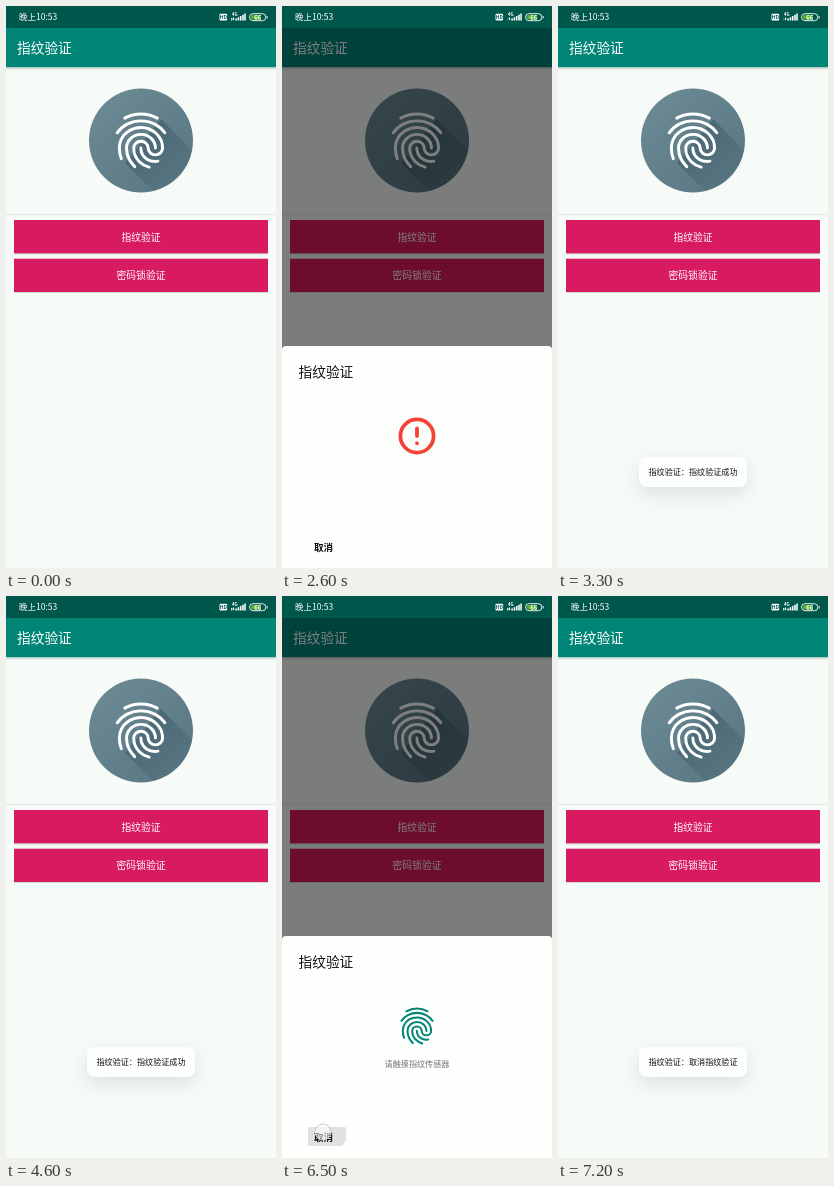
These frames come from a looping animation (270 px wide and 562 px high, 8000 ms). An HTML page:

```html
<!DOCTYPE html>
<html lang="zh-CN">
<head>
<meta charset="utf-8">
<title>指纹验证</title>
<style>
@property --open { syntax: "<number>"; inherits: true; initial-value: 0; }
@property --error { syntax: "<number>"; inherits: true; initial-value: 0; }

html, body { margin: 0; height: 100%; overflow: hidden; background: #f7fbf8; }
svg.stage {
  display: block; width: 100vw; height: 100vh;
  font-family: "Noto Sans CJK SC", "Noto Sans CJK", "Noto Sans", sans-serif;
  animation: open 8s step-end infinite, error 8s step-end infinite;
}
.title { font-size: 13.7px; }
.button { font-size: 9.8px; fill: #fff; text-anchor: middle; }
.small { font-size: 8.1px; text-anchor: middle; }
.print { fill: none; stroke-linecap: round; }

.dim { opacity: min(.5, calc(var(--open) * .55)); }
.sheet { transform: translateY(calc((1 - var(--open)) * 222px)); }
.content { opacity: min(1, calc(var(--open) * 1.15)); }
.idle { opacity: calc(1 - var(--error)); }
.failed { opacity: var(--error); }

.toast {
  opacity: 0; transform-origin: 135px 466px;
  animation: 8s step-end infinite;
}
.toast rect { filter: drop-shadow(0 7px 9px rgba(0, 30, 20, .11)); }
.passed { animation-name: passed; }
.cancelled { animation-name: cancelled; }
.touch { opacity: 0; animation: touch 8s step-end infinite; }
.ripple { opacity: 0; transform-origin: 41px 534px; animation: ripple 8s step-end infinite; }
.traffic { animation: traffic 8s step-end infinite; }

/* The screen refreshes every 100 ms, which is 1.25% of the loop. */
@keyframes open {
  0% { --open: 0; }
  22.5% { --open: .14; }
  23.75% { --open: .46; }
  25% { --open: .82; }
  26.25% { --open: .96; }
  27.5% { --open: 1; }
  35% { --open: .6; }
  36.25% { --open: .158; }
  37.5% { --open: 0; }
  68.75% { --open: .14; }
  70% { --open: .46; }
  71.25% { --open: .82; }
  72.5% { --open: .96; }
  73.75% { --open: 1; }
  83.75% { --open: .6; }
  85% { --open: .158; }
  86.25%, 100% { --open: 0; }
}
@keyframes error {
  0% { --error: 0; }
  28.75% { --error: .25; }
  30% { --error: .5; }
  31.25% { --error: .8; }
  32.5% { --error: 1; }
  37.5%, 100% { --error: 0; }
}
@keyframes passed {
  0% { opacity: 0; }
  36.25% { opacity: .92; transform: scale(.955); }
  37.5% { opacity: 1; transform: scale(.985); }
  38.75% { opacity: 1; transform: none; }
  60% { opacity: .35; transform: none; }
  61.25%, 100% { opacity: 0; }
}
@keyframes cancelled {
  0% { opacity: 0; }
  85% { opacity: .92; transform: scale(.955); }
  86.25% { opacity: 1; transform: scale(.985); }
  87.5%, 100% { opacity: 1; transform: none; }
}
@keyframes touch {
  0% { opacity: 0; }
  17.5% { opacity: 1; transform: translate(188px, 227px); }
  20% { opacity: 0; }
  66.25% { opacity: 1; transform: translate(188px, 269px); }
  68.75% { opacity: 0; }
  81.25% { opacity: 1; transform: translate(41px, 536px); }
  83.75%, 100% { opacity: 0; }
}
@keyframes ripple {
  0% { opacity: 0; }
  81.25% { opacity: 1; transform: none; }
  82.5% { opacity: .7; transform: scale(1.5); }
  83.75%, 100% { opacity: 0; }
}
@keyframes traffic {
  0% { opacity: 1; }
  22.5% { opacity: .3; }
  57.5% { opacity: 1; }
  100% { opacity: 1; }
}
</style>
</head>
<body>
<svg class="stage" viewBox="0 0 270 562">
  <defs>
    <symbol id="print" viewBox="0 0 24 24">
      <path d="M6.2 3.97C7.9 3 9.9 2.5 12 2.5s4 .5 5.8 1.47"/>
      <path d="M3.5 9.22c.95-1.33 2.14-2.38 3.57-3.11 3-1.55 6.85-1.55 9.86 0 1.43.73 2.6 1.75 3.56 3.08"/>
      <path d="M4.97 18.45c-.63-1.64-.7-2.94-.7-3.78 0-1.12.21-2.14.63-3.02 1.27-2.62 4.03-4.32 7.06-4.32 4.28 0 7.75 3.29 7.75 7.33a2.58 2.44 0 0 1-5.16 0 2.58 2.44 0 0 0-5.16 0c0 1.86.72 3.58 2.02 4.87 1 1 2 1.56 3.5 1.97"/>
      <path d="M9.75 21.29c-.82-.83-1.25-1.35-1.92-2.53-.65-1.16-.99-2.58-.99-4.1 0-2.7 2.31-4.89 5.16-4.89s5.16 2.19 5.16 4.89"/>
      <path d="M11.94 14.66c0 1.58.8 3.07 2.16 3.98.79.53 1.71.8 2.82.8.27 0 .7-.03 1.12-.11"/>
    </symbol>
    <linearGradient id="disc" x2="1" y2="1">
      <stop stop-color="#6d8c94"/>
      <stop offset=".6" stop-color="#5f7e8a"/>
      <stop offset="1" stop-color="#587681"/>
    </linearGradient>
    <linearGradient id="cast" gradientUnits="userSpaceOnUse" x1="135" y1="134" x2="176" y2="175">
      <stop stop-color="#1d3c48" stop-opacity=".34"/>
      <stop offset="1" stop-color="#1d3c48" stop-opacity=".04"/>
    </linearGradient>
    <linearGradient id="fade" x2="0" y2="1">
      <stop stop-color="#003c32" stop-opacity=".3"/>
      <stop offset="1" stop-color="#003c32" stop-opacity="0"/>
    </linearGradient>
    <clipPath id="round"><circle cx="135" cy="134.5" r="52"/></clipPath>
    <clipPath id="cancel"><rect x="26" y="531" width="38" height="19" rx="1.5"/></clipPath>
  </defs>

  <rect width="270" height="562" fill="#f7fbf8"/>
  <rect y="22" width="270" height="39" fill="#008577"/>
  <rect y="61" width="270" height="3" fill="url(#fade)"/>
  <text class="title" x="11" y="47.2" fill="#fff">指纹验证</text>

  <circle cx="135" cy="134.5" r="52" fill="url(#disc)"/>
  <path d="M155 113l50 50-40 40-46-46z" fill="url(#cast)" clip-path="url(#round)"/>
  <use class="print" href="#print" x="101.4" y="101" width="67.2" height="67.2" stroke="#fff" stroke-width="1.05"/>

  <path d="M0 208.5h270" stroke="#e3e8e5"/>
  <g fill="#24332c" opacity=".16">
    <rect x="8" y="215" width="254" height="33.5"/>
    <rect x="8" y="253.5" width="254" height="33.5"/>
  </g>
  <g fill="#d81b60">
    <rect x="8" y="214" width="254" height="33.3"/>
    <rect x="8" y="252.7" width="254" height="33.3"/>
  </g>
  <text class="button" x="135" y="234.7">指纹验证</text>
  <text class="button" x="135" y="273.2">密码锁验证</text>

  <g class="toast passed">
    <rect x="81" y="451" width="108" height="30" rx="8" fill="#fdfffe"/>
    <text class="small" x="135" y="469.1" fill="#111">指纹验证：指纹验证成功</text>
  </g>
  <g class="toast cancelled">
    <rect x="81" y="451" width="108" height="30" rx="8" fill="#fdfffe"/>
    <text class="small" x="135" y="469.1" fill="#111">指纹验证：取消指纹验证</text>
  </g>

  <rect class="dim" y="22" width="270" height="540"/>

  <g class="sheet">
    <path d="M0 562V344q0-4 4-4h262q4 0 4 4V562z" fill="#fdfffd"/>
    <g class="content">
      <text class="title" x="16.5" y="371.2" fill="#111">指纹验证</text>
      <g class="idle">
        <use class="print" href="#print" x="113" y="408" width="44" height="44" stroke="#008577" stroke-width="1.1"/>
        <text class="small" x="135" y="471.2" fill="#737673">请触摸指纹传感器</text>
      </g>
      <g class="failed" fill="none" stroke="#f44336" stroke-width="3.8" stroke-linecap="round">
        <circle cx="135" cy="430" r="16.6"/>
        <path d="M135 422.5v7.5M135 437.1v.2"/>
      </g>
      <g clip-path="url(#cancel)">
        <circle class="ripple" cx="41" cy="534" r="25" fill="#dfe2e0"/>
      </g>
      <text x="32" y="545" font-size="9.5" font-weight="700" fill="#111">取消</text>
    </g>
  </g>

  <circle class="touch" r="8" fill="#fff" fill-opacity=".55" stroke="#c3c9c6" stroke-width="1"/>

  <g fill="#fff">
    <rect width="270" height="22" fill="#00574b"/>
    <text x="13" y="14.2" font-size="8.5" font-weight="500">晚上10:53</text>
    <rect x="213.5" y="7.8" width="7.6" height="6.6" rx="1"/>
    <text x="217.3" y="13" font-size="4.8" font-weight="700" text-anchor="middle" fill="#00574b">HD</text>
    <text x="226" y="10" font-size="4.3" font-weight="700">4G</text>
    <path class="traffic" d="M225.2 12h1.2v2.6h-1.2z"/>
    <path d="M227 11.5h1.1v2.6H227zM229.3 12.4h1.6v2.1h-1.6zM231.6 11.2h1.6v3.3h-1.6zM233.9 10h1.6v4.5h-1.6zM236.2 8.8h1.6v5.7h-1.6zM238.3 7.5h1.5v7h-1.5z"/>
    <rect x="243.5" y="7.7" width="16.4" height="7" rx="3.5" fill="#00574b" stroke="#fff" stroke-width=".9"/>
    <path d="M247.2 8.9h7.5v4.6h-7.5a2.3 2.3 0 0 1 0-4.6z" fill="#57b82e"/>
    <path d="M260.7 10h.9v2.4h-.9z"/>
    <text x="251.7" y="13.6" font-size="6" font-weight="700" text-anchor="middle">66</text>
  </g>
</svg>
</body>
</html>
```
